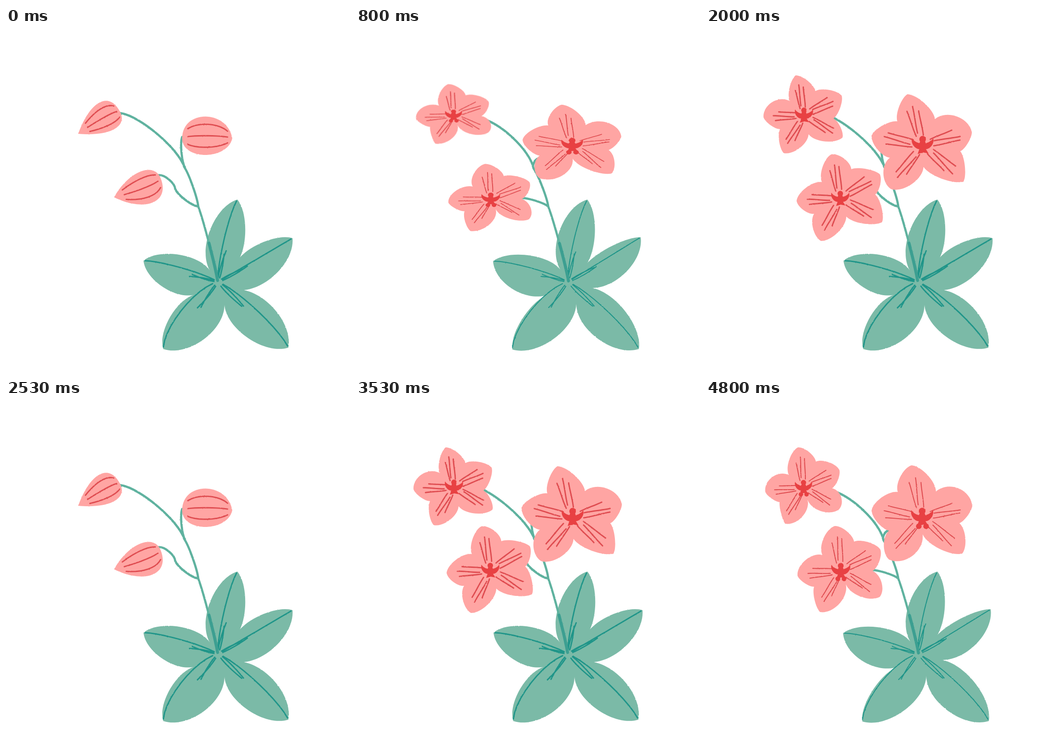
Write an HTML page that moves like this. It is 748 by 748 pixels and loops after 4.99 s.

```html
<!DOCTYPE html>
<html lang="en">
<head>
<meta charset="utf-8">
<title>Blooming orchid</title>
<style>
  html, body { margin: 0; width: 100%; height: 100%; overflow: hidden; background: #fff; }
  svg { display: block; width: 100vw; height: 100vh; }
  path { stroke-linecap: round; stroke-linejoin: round; }
  .leaf { fill: #7bbaa7; }
  .rib { fill: none; stroke: #1f9589; }
  .stem { fill: none; stroke: #5fb29f; stroke-width: 4.8; }
  .base { fill: none; stroke: #3c9f91; stroke-width: 6.5; }
  .petal { fill: #ffa5a3; }
  .vein { fill: none; stroke: #df4d51; }
  .heart { fill: #e84143; }
  .bold { stroke-width: 2.9; }
  .fine { stroke-width: 2.1; }
</style>
</head>
<body>
<svg viewBox="0 0 748 748">
  <filter id="rough" filterUnits="userSpaceOnUse" x="0" y="0" width="748" height="748" color-interpolation-filters="sRGB">
    <feTurbulence type="fractalNoise" baseFrequency=".3" numOctaves="2" seed="4"/>
    <feDisplacementMap in="SourceGraphic" scale="2" xChannelSelector="R" yChannelSelector="G"/>
  </filter>
</svg>
<script>
// A shape is a clockwise ring of corners "x,y,bulge": the edge arriving at a
// corner swells outwards by that share of its length.
// Leaves and open flowers alternate tip, notch, tip, notch...
const leaves = {
  bold: '503,373,.25 500,512,.18 623,457,.18 497,569,.27 614,695,.27 475,602,.25 342,698,.28 413,579,.22 299,506,.25 443,527,.22',
  fine: '503,373,.26 496,520,.18 619,455,.12 503,564,.28 615,698,.23 479,600,.27 340,699,.26 424,577,.18 298,507,.3 444,525,.2'
};
const hub = [461, 552];
const ribBends = [-.06, 0, -.08, .16, .06];

const stems = {
  arched: ['249,185 388,303,.125 418,388,.05 460,549,.02', '383,237 389,303,-.09', '332,320 368,350,.2 418,388,-.12'],
  bent: ['270,197 386,305,.15 418,388,.05 462,550,.02', '400,283 386,305,-.3', '360,370 418,388,.08']
};

const buds = [
  { root: [248, 182], tip: [157, 230], left: .36, right: .5, full: .45 },
  { root: [383, 240], tip: [492, 240], left: .58, right: .44, full: .9 },
  { root: [336, 326], tip: [235, 368], left: .52, right: .36, full: .55 }
];

// In a bell every second corner is a petal tip; the fold is the front petal's rim.
const bells = [
  { root: [253, 190], fold: '185,186 174,210,-.1 236,209,-.07',
    ring: '253,185,.4 212,260,.26 211,247 150,257,.12 160,220,.05 131,216 164,172,.1 146,160 216,160,.27' },
  { root: [382, 240], fold: '442,199 495,248 410,270,.05',
    ring: '425,187,.33 516,176,.12 505,189 569,235,.12 515,252,.05 553,303,.15 467,309,.1 470,325 380,247,.11' },
  { root: [345, 330], fold: '286,328 259,368 331,373,-.09',
    ring: '345,323,.23 288,421,.29 291,407 228,429,.16 242,375,.1 192,369 248,328,.15 229,302,.1 304,309,.26' }
];

const pointed = [
  { center: [213, 190], size: 1,
    ring: '195,103,.16 238,137,.17 295,147,.17 277,197,.15 297,238,.17 223,231,.22 169,272,.24 161,220,.15 125,194,.15 182,159,.36' },
  { center: [471, 255], size: 1.2,
    ring: '438,144,.16 498,198,.17 578,226,.33 553,268,.14 560,334,.13 473,302,.15 402,350,.26 400,282,.3 360,234,.2 416,203,.16' },
  { center: [292, 371], size: 1,
    ring: '272,275,.19 316,307,.23 378,318,.13 368,362,.17 383,422,.14 305,410,.16 250,463,.21 235,404,.22 197,376,.2 252,335,.21' }
];

const rounded = [
  { center: [212, 190], size: .95,
    ring: '200,103,.2 239,134,.19 290,152,.2 274,192,.16 289,238,.36 221,217,.28 172,269,.31 160,222,.08 129,200,.13 180,163,.37' },
  { center: [470, 255], size: 1.22,
    ring: '447,142,.21 500,199,.19 579,230,.38 551,268,.13 557,334,.2 471,292,.17 398,347,.35 398,284,.24 360,240,.17 417,200,.2' },
  { center: [293, 372], size: 1.05,
    ring: '280,274,.23 322,308,.19 379,325,.17 362,372,.18 378,428,.28 304,400,.24 248,461,.3 235,406,.13 199,382,.15 253,337,.28' }
];

const heartRing = '-19,-13,.3 0,-4,-.2 19,-13,-.2 6,7,.3 11,15 1,13 -9,16 -6,7';

const parse = text => text.split(' ').map(p => p.split(',').map(Number));
const mix = (a, b, t) => [0, 1].map(k => a[k] + (b[k] - a[k]) * t);

// The two control points of an edge, pushed sideways by h1 and h2.
function controls(a, b, h1, h2 = h1, near = .2, far = .8) {
  const push = (t, h) => {
    const [x, y] = mix(a, b, t);
    return [x + (b[1] - a[1]) * h, y - (b[0] - a[0]) * h];
  };
  return [push(near, h1), push(far, h2)];
}

const edge = (a, b) => `C${controls(a, b, b[2] || 0).join(' ')} ${b.slice(0, 2)}`;
const chain = pts => 'M' + pts[0].slice(0, 2) + pts.slice(1).map((p, i) => edge(pts[i], p)).join('');
const ringPath = pts => chain([...pts, pts[0]]) + 'Z';

// The part of a curve between two of its parameters.
function stroke(a, b, [c1, c2], from, to) {
  const pts = [];
  for (let i = 0; i <= 10; i++) {
    const t = from + (to - from) * i / 10;
    const p = mix(c1, c2, t);
    pts.push(mix(mix(mix(a, c1, t), p, t), mix(p, mix(c2, b, t), t), t).map(n => n.toFixed(1)));
  }
  return 'M' + pts.join('L');
}
const bent = (a, b, h1, h2, from, to) => stroke(a, b, controls(a, b, h1, h2), from, to);

const path = (cls, d) => `<path class="${cls}" d="${d}"/>`;

// Calls make(tip, notchBefore, notchAfter, index) for every petal of a ring.
function eachPetal(ring, make) {
  let d = '';
  for (let i = 0; i < ring.length; i += 2) {
    d += make(ring[i], ring.at(i - 1), ring[i + 1], i / 2);
  }
  return d;
}

function leafArt(weight) {
  const ring = parse(leaves[weight]);
  const ribs = eachPetal(ring, (tip, before, after, i) =>
    bent(tip, hub, ribBends[i], ribBends[i], .03, .92) +
    [before, after].map((notch, side) => {
      const bend = side ? .08 : -.08;
      return bent(hub, mix(tip, notch, .5), bend, bend, .12, .58);
    }).join(''));
  return path('leaf', ringPath(ring)) + path('rib ' + weight, ribs);
}

function stemArt(name) {
  const [main, ...twigs] = stems[name].map(parse);
  const [, , fork, foot] = main;
  return path('stem', [main, ...twigs].map(chain).join('')) +
    path('base', bent(fork, foot, foot[2], foot[2], .5, 1));
}

function budArt({ root, tip, left, right, full }, weight) {
  const side = h => controls(root, tip, h, h, 0, full);
  const body = `M${root}C${side(left).join(' ')} ${tip}C${side(-right).reverse().join(' ')} ${root}Z`;
  const veins = [.2, .5, .8].map(f =>
    stroke(root, tip, side(f * (left + right) - right), .22, .85)).join('');
  return path('petal', body) + path('vein ' + weight, veins);
}

function bellArt({ root, fold, ring }, weight) {
  const pts = parse(ring), rim = parse(fold);
  let veins = chain(rim);
  pts.forEach((tip, i) => {
    if (i % 2) veins += bent(tip, root, .08, .08, .12, .38) + bent(tip, root, -.12, -.08, .16, .36);
  });
  for (const h of [-.2, .15]) veins += bent(root, rim[1], h, h, .35, .58);
  return path('petal', ringPath(pts)) + path('vein ' + weight, veins);
}

function flowerArt({ center, size, ring }, weight) {
  const pts = parse(ring);
  const veins = eachPetal(pts, (tip, before, after) =>
    bent(center, tip, .1, -.1, .28, .72) +
    bent(center, mix(tip, before, .4), .12, -.06, .28, .8) +
    bent(center, mix(tip, after, .4), -.12, .06, .28, .8));
  const lobes = weight === 'fine' ? '<circle cx="-6" cy="16" r="5"/><circle cx="7" cy="16" r="5"/>' : '';
  return path('petal', ringPath(pts)) + path('vein ' + weight, veins) +
    `<g class="heart" transform="translate(${center}) scale(${size})">
      <circle cy="-11" r="6"/><ellipse rx="6" ry="11"/>${path('heart', ringPath(parse(heartRing)))}${lobes}</g>`;
}

function squash(art, [x, y], scale) {
  return `<g transform="translate(${x} ${y}) scale(${scale}) translate(${-x} ${-y})">${art}</g>`;
}

function plant(weight, stem, flowers, art, scale = '1 1') {
  return '<g filter="url(#rough)" visibility="hidden">' + leafArt(weight) + stemArt(stem) +
    flowers.map(f => squash(art(f, weight), f.root || f.center, scale)).join('') + '</g>';
}

const svg = document.querySelector('svg');
svg.insertAdjacentHTML('beforeend', [
  plant('bold', 'arched', buds, budArt),
  plant('fine', 'arched', bells, bellArt, '.97 .86'),
  plant('bold', 'arched', bells, bellArt),
  plant('fine', 'bent', rounded, flowerArt, '.98 .78'),
  plant('bold', 'arched', pointed, flowerArt),
  plant('fine', 'bent', rounded, flowerArt)
].join(''));
const poses = svg.querySelectorAll(':scope > g');

// Four steps a second; ten steps open the flowers once.
const loop = 4990;
const beats = [0, 270, 530, 800];
const order = [0, 1, 2, 3, 4, 5, 4, 5, 4, 5];

let shown = -1, begin;
function draw(now) {
  begin ??= now;
  const time = Math.max(0, now - begin) % loop;
  const beat = beats.filter(b => b <= time % 1000).length - 1;
  const pose = order[(Math.floor(time / 1000) * 4 + beat) % 10];
  if (pose !== shown) {
    poses.forEach((g, i) => g.setAttribute('visibility', i === pose ? 'visible' : 'hidden'));
    shown = pose;
  }
  requestAnimationFrame(draw);
}
draw(performance.now());
</script>
</body>
</html>
```
